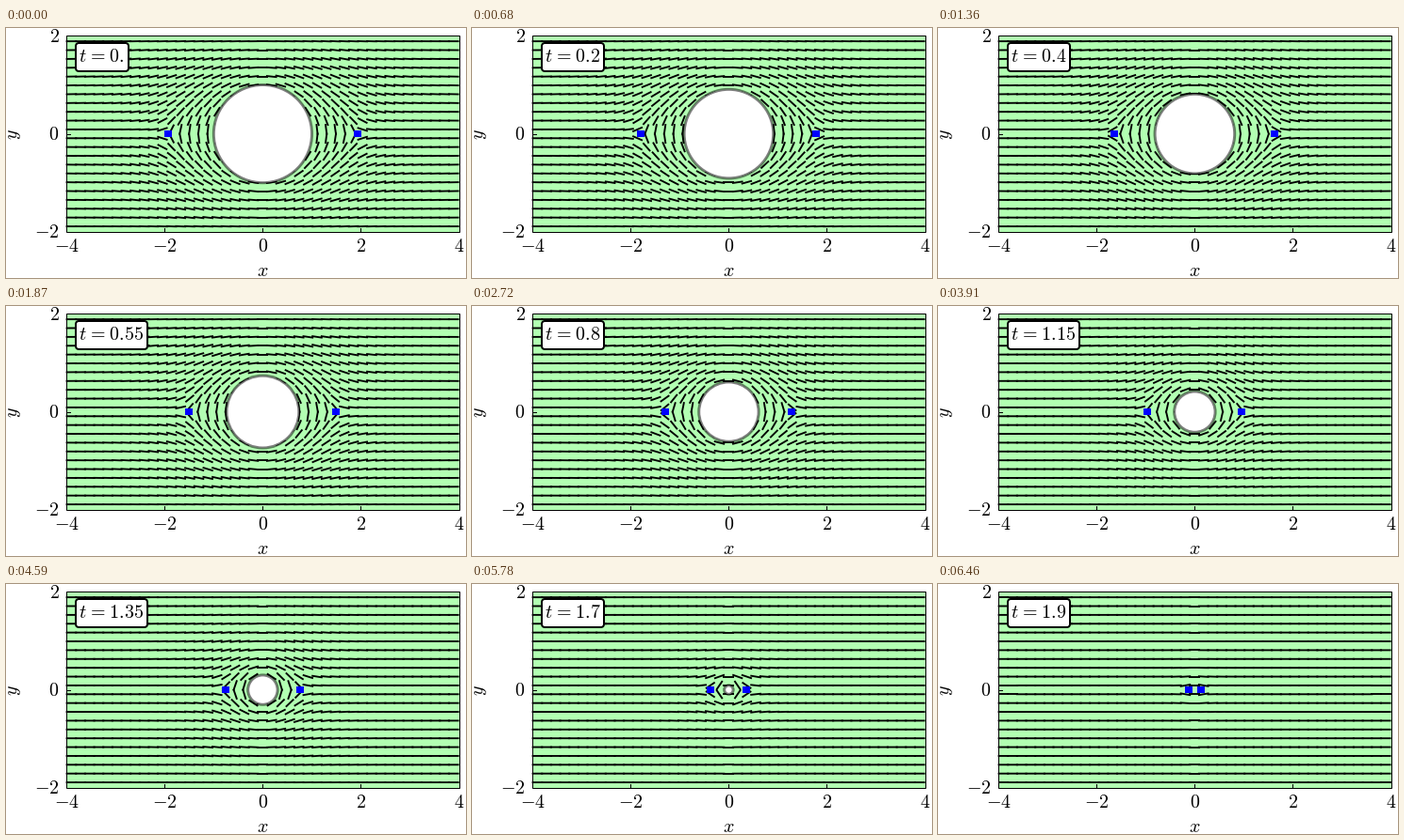
These frames come from a looping animation (488 by 266 pixels, 6.63 s). A matplotlib script:

```python
import numpy as np
import matplotlib.pyplot as plt
from matplotlib.animation import FuncAnimation
from matplotlib.collections import LineCollection
from matplotlib.patches import Circle, FancyBboxPatch, Rectangle

W, H, DPI = 488, 266, 100
PX = 72 / DPI                # points per pixel
LEFT, TOP, RIGHT, BOTTOM = 64, 8, 481, 217
CX, CY, UNIT = 272.1, 112.6, 52.1
STEPS, STEP_MS = 39, 170
ROD = 0.225                  # director length in plot units

plt.rcParams["mathtext.fontset"] = "cm"

fig = plt.figure(figsize=(W / DPI, H / DPI), dpi=DPI, facecolor="white")
ax = fig.add_axes([0, 0, 1, 1])
ax.set_xlim(0, W)
ax.set_ylim(H, 0)
ax.axis("off")


def to_px(z):
    return np.stack([CX + UNIT * z.real, CY - UNIT * z.imag], axis=-1)


def label(x, y, s, **kw):
    kw = {"ha": "center", "va": "baseline", **kw}
    return ax.text(x, y, f"${s}$", fontsize=20 * PX, color="black", **kw)


def disc_radius(t):
    return max(0.0, 1 - 0.45 * t - 0.05 * t**2)


def defect_distance(t):
    return 1.93 - 0.725 * t - 0.075 * t**2 - 0.023 * t**3


def directors(t):
    """Rods around the disc and two -1/2 defects, level at the walls y = +-2."""
    a = np.pi / 4            # sinh(a z) repeats the charges across the walls
    s = np.sinh(a * grid)
    d = np.sinh(a * defect_distance(t))
    image = (a * disc_radius(t)) ** 2 / d
    w = s**2 / np.sqrt((s**2 - d**2) * (s**2 - image**2))
    half = ROD / 2 * np.exp(1j * np.angle(w))
    return np.stack([to_px(grid - half), to_px(grid + half)], axis=1)


gx, gy = np.meshgrid(np.linspace(-3.89, 3.89, 43), np.linspace(-1.89, 1.89, 22))
grid = (gx + 1j * gy).ravel()

# Plot area, frame and ticks
ax.add_patch(Rectangle((LEFT, TOP), RIGHT - LEFT, BOTTOM - TOP,
                       fc="#b2ffb2", ec="black", lw=PX, zorder=1))
for v in (-4, -2, 0, 2, 4):
    x = CX + v * UNIT
    if abs(v) < 4:
        ax.plot([x, x], [BOTTOM, BOTTOM - 4], color="black", lw=PX, zorder=2)
    label(x + 0.4, 238.5, v)
for v in (-2, 0, 2):
    y = CY - v * UNIT
    if v == 0:
        ax.plot([LEFT, LEFT + 4], [y, y], color="black", lw=PX, zorder=2)
    label(56.5, y + 6.5, v, ha="right")
label(272.5, 263.5, "x")
label(8, 113, "y", va="center", rotation=90)

# Moving parts
rods = LineCollection([], colors="black", linewidths=1.9 * PX,
                      capstyle="butt", zorder=3)
ax.add_collection(rods)
disc = Circle((CX + 0.3, CY), 1, fc="white", ec=(0, 0, 0, 0.5),
              lw=3 * PX, zorder=4)
ax.add_patch(disc)
defects = [Rectangle((0, CY - 3.5), 8, 7, fc="blue", ec="none", zorder=5)
           for _ in range(2)]
for square in defects:
    ax.add_patch(square)
box = FancyBboxPatch((74, 16), 56, 30, boxstyle="round,pad=0,rounding_size=3.5",
                     fc="white", ec="black", lw=2 * PX, zorder=6)
ax.add_patch(box)
clock = label(77, 36.5, "t", ha="left", zorder=7)


def draw(k):
    t = k / 20
    rods.set_segments(directors(t))
    r = disc_radius(t)
    disc.set_radius(r * UNIT)
    disc.set_visible(r > 0)
    d = defect_distance(t) * UNIT
    for square, side in zip(defects, (-1, 1)):
        square.set_x(CX + side * d - 4)
    value = f"{t:.2f}".rstrip("0")
    clock.set_text(rf"$t\hspace{{0.08}}=\hspace{{0.08}}{value}$")
    box.set_width(56 + 10 * (len(value) - 2))
    return [rods, disc, *defects, box, clock]


anim = FuncAnimation(fig, draw, frames=STEPS, interval=STEP_MS,
                     init_func=lambda: draw(0), repeat=True, repeat_delay=0)
plt.show()
```
